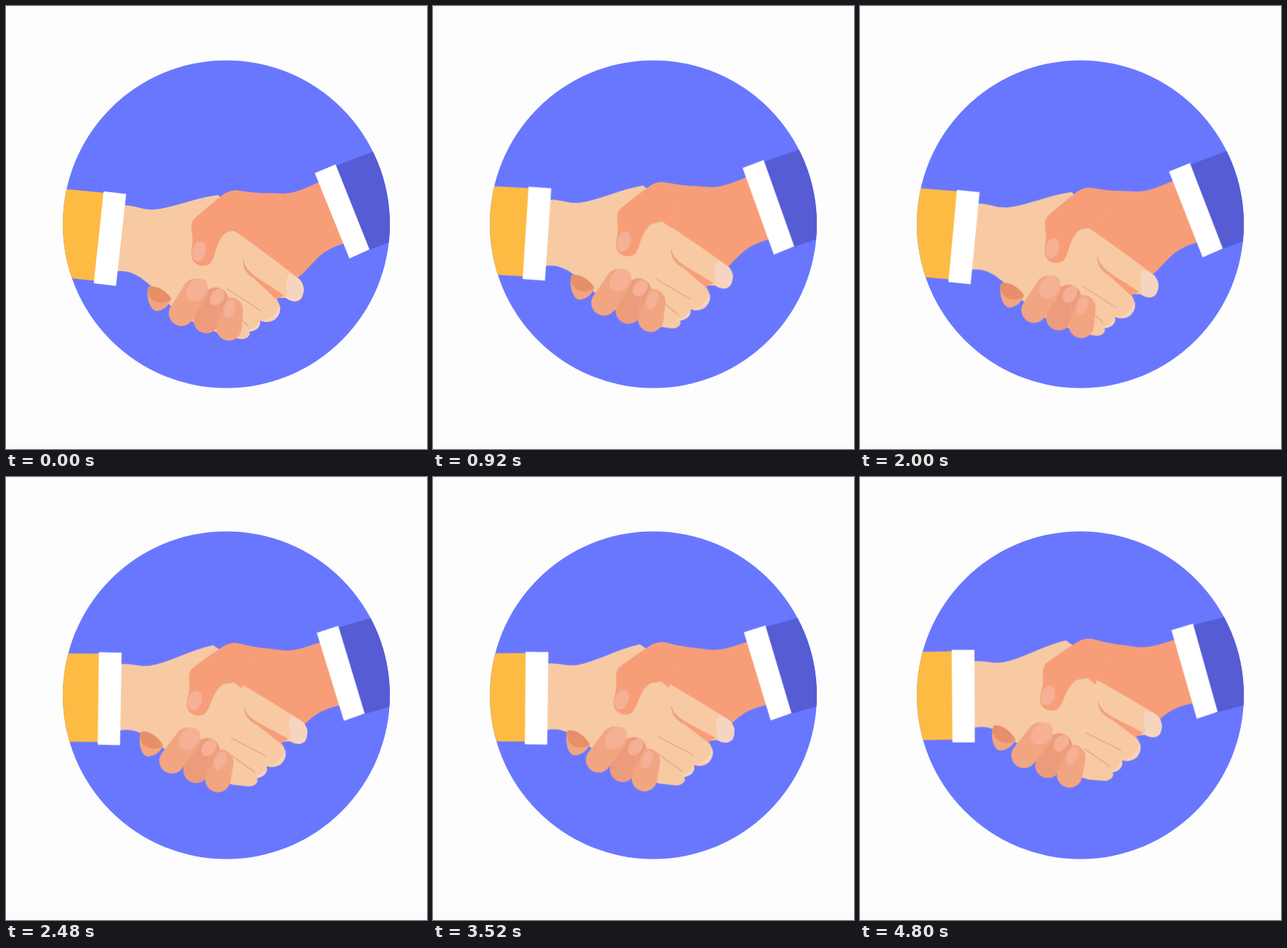
Animation of 578 by 607 pixels, one loop 4.86 s. Source, as an HTML page without scripts:

```html
<!DOCTYPE html>
<html lang="en">
<head>
<meta charset="utf-8">
<title>Handshake</title>
<style>
  html, body { margin: 0; width: 100%; height: 100%; overflow: hidden; background: #fdfdfd; }
  svg { display: block; width: 100%; height: 100%; }

  /* Each arm swings around its own elbow, outside the disc. */
  .left, .right { animation: shake 4860ms cubic-bezier(.37, 0, .63, 1) infinite; }
  .left  { transform-origin: -18px 316px; --low: .2deg;  --high: -6.6deg; }
  .right { transform-origin: 605px 253px; --low: -.2deg; --high: 6.1deg; }
  @keyframes shake {
    0% { transform: rotate(0deg); }
    1%, 23.1%, 43.8%, 64%, 86.4% { transform: rotate(var(--low)); }
    13.4%, 33.1%, 53.9%, 75.3%, 98.4%, 100% { transform: rotate(var(--high)); }
  }

  .skin { fill: #f7caa4; }
  .tan { fill: #f79e78; }
  .tip { fill: #f6d5c0; }
  .nail { fill: #f5b095; }
  .crease { fill: none; stroke: #dfa77f; stroke-width: 1.4; stroke-linecap: round; }
  .finger { fill: none; stroke: #f2a581; stroke-width: 35; stroke-linecap: round; }
  .shade { stroke: #ec9c7a; }
</style>
</head>
<body>
<svg viewBox="0 0 578 607" preserveAspectRatio="none">
  <defs>
    <clipPath id="disc"><circle cx="302.5" cy="299" r="224.5"/></clipPath>
  </defs>
  <path fill="#f8f8f8" d="M0 0H578V2H0Z"/>
  <path fill="#fafafa" d="M0 597H578V607H0Z"/>

  <g clip-path="url(#disc)">
    <path fill="#6977ff" d="M70 70H535V530H70Z"/>

    <!-- right arm and back of its hand -->
    <g class="right">
      <path fill="#555cd4" d="M448 221L560 178V311L494 336Z"/>
      <path class="tan" d="M296 260C304 254 311 252 319 253C342 257 362 256 382 257C400 256 416 247 436 239L470 324C448 329 434 338 424 349C413 360 406 372 391 376L330 350L296 310Z"/>
      <path fill="#fff" d="M424 229L452.500 217L499 333.500L471.500 346Z"/>
    </g>

    <!-- left arm, palm and fingers -->
    <g class="left">
      <path fill="#fdbb44" d="M20 245L136 256L123 376.500L20 366Z"/>
      <path class="skin" d="M158 273C176 272 185 279 202 279C230 277 258 263 291 259L304 270L302 303L316 310C345 330 374 352 400 372C410 379 411 392 405 401C399 407 391 405 384 400L370 400C378 408 378 421 370 429C364 434 355 434 349 431C350 439 343 446 334 446C337 452 329 458 320 456L300 452L240 425C222 409 213 393 197 382C182 369 170 361 148 364Z"/>
      <path class="tan" d="M326 350C326 359 331 365 338 371L371 402L382 397C366 385 345 374 334 363C330 359 328 355 326 350Z"/>
      <path class="crease" d="M326 349C326 360 331 366 339 372M304 388L349 417M300 410L332 438"/>
      <path class="tip" d="M389 367L400 372C410 379 411 392 405 401C399 407 390 405 383 399C390 390 379 381 389 367Z"/>
      <path class="tip" d="M376 410C378 421 374 433 349 431C362 430 371 424 376 410ZM349 432C349 442 342 447 328 445C338 444 344 439 349 432Z"/>
      <path fill="#fff" d="M134 254L165 257.500L151 383.500L120.500 380Z"/>
    </g>

    <!-- thumb and fingers closing over the palm -->
    <g class="right">
      <path class="tan" d="M319 253C311 252 304 254 296 260C284 269 270 281 259 291C252 297 255 308 256 317C257 327 253 337 255 345C258 355 268 358 277 355C285 352 286 339 290 329C294 319 298 312 305 309L316 306L328 314L345 257Z"/>
      <path class="crease" stroke="#f3a984" d="M297 312C303 308 309 308 316 306"/>
      <ellipse class="nail" cx="265" cy="336" rx="9.500" ry="14" transform="rotate(14 265 336)"/>

      <path fill="#f2a581" d="M195 385C203 382 218 387 227 401C224 411 215 418 206 418C197 416 192 398 195 385Z"/>
      <path fill="#e78f68" d="M195 385C203 382 218 387 227 401C220 409 205 408 199 401C195 396 194 391 195 385Z"/>

      <path class="finger shade" d="M288 403L275 431"/>
      <path class="finger" d="M308 417L306 441"/>
      <path class="finger" d="M260 391L241 421"/>
      <path fill="#ec9c7a" d="M294 402L303 401C296 414 292 428 289 440Z"/>
      <ellipse class="nail" cx="262" cy="389" rx="13" ry="17" transform="rotate(38 262 389)"/>
      <ellipse class="nail" cx="290" cy="399" rx="9" ry="12.500" transform="rotate(32 290 399)"/>
      <ellipse class="nail" cx="307" cy="415" rx="7.500" ry="13" transform="rotate(20 307 415)"/>
    </g>
  </g>
</svg>
</body>
</html>
```
